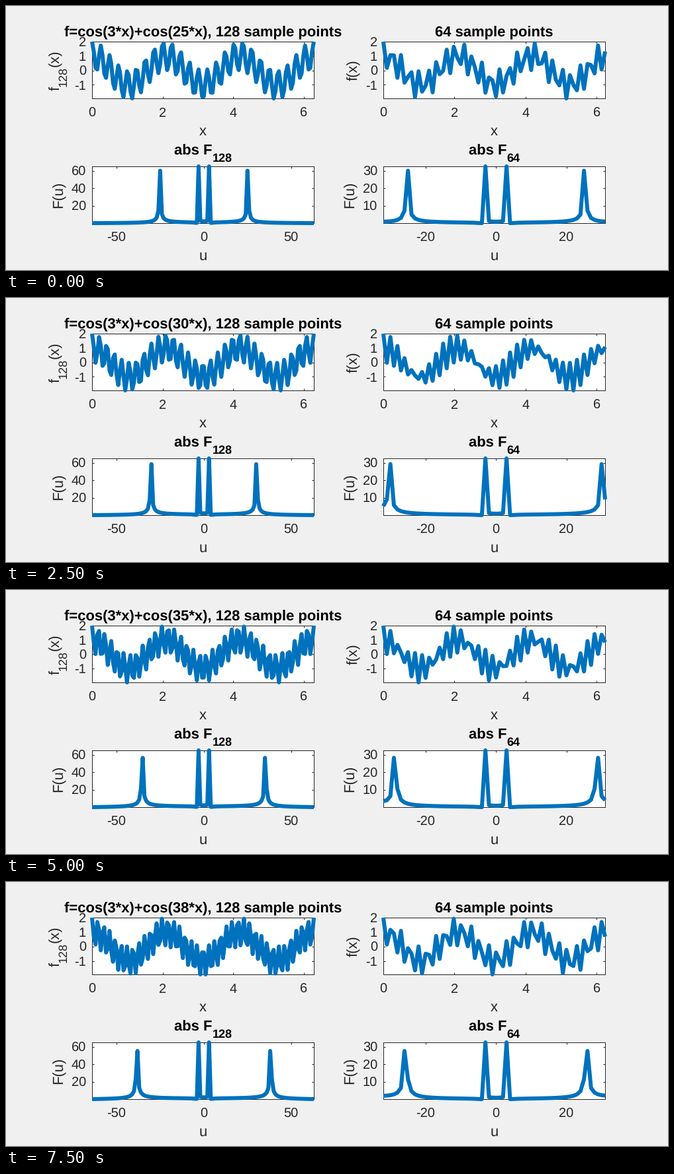
A matplotlib script for the animation above (8000 ms loop, 1000 by 400 pixels).

```python
import numpy as np
import matplotlib.pyplot as plt
from matplotlib.animation import FuncAnimation

W, H, DPI = 1000, 400, 100
PX = 72 / DPI  # points per pixel
INK = "#262626"
BLUE = "#0072bd"
LABEL, TICK, SUB = 22, 20, 17.6
PEAK, FRAMES = 39, 16

plt.rcParams.update({
    "font.family": "Liberation Sans",
    "text.hinting": "none",
    "text.hinting_factor": 1,
    "axes.unicode_minus": False,
    "path.simplify": False,
})

fig = plt.figure(figsize=(W / DPI, H / DPI), dpi=DPI, facecolor="#f0f0f0")


def put(x, y, s, size=LABEL, ha="center", **kw):
    """Write text with its baseline at a pixel position from the top left."""
    kw.setdefault("color", INK)
    return fig.text(x / W, 1 - y / H, s, fontsize=size * PX, ha=ha,
                    va="baseline", **kw)


def upward(x, y, s, size=LABEL):
    """Write text upwards, its baseline starting at (x, y)."""
    return put(x, y, s, size, "left", rotation=90, rotation_mode="anchor")


def panel(left, top, xlim, xticks, yticks, xlabel):
    w, h = 335, 86
    ax = fig.add_axes([left / W, 1 - (top + h) / H, w / W, h / H])
    ax.set_xlim(*xlim)
    ax.set_xticks(xticks, [str(t) for t in xticks])
    ax.set_yticks(yticks, [str(t) for t in yticks])
    ax.tick_params(direction="in", top=True, right=True, length=3.4 * PX,
                   width=PX, color=INK, labelcolor=INK, labelsize=TICK * PX)
    ax.tick_params(axis="x", pad=13.6 * PX)
    ax.tick_params(axis="y", pad=9 * PX)
    for spine in ax.spines.values():
        spine.set(linewidth=PX, color=INK)
    put(left + w / 2, top + h + 55.5, xlabel)
    line, = ax.plot([], [], color=BLUE, lw=6 * PX, clip_on=False, zorder=4,
                    solid_joinstyle="round", solid_capstyle="butt")
    return ax, line


def abs_title(x, n):
    bold = dict(ha="left", weight="bold", color="black")
    put(x, 225.5, "abs F", **bold)
    put(x + 57.5, 236, str(n), SUB, **bold)


x128 = np.linspace(0, 2 * np.pi, 128)
x64 = x128[::2]
u128 = np.arange(-64, 64)
u64 = np.arange(-32, 32)

wave_ticks = [-1, 0, 1, 2]
panels = [
    panel(130, 54, (0, x128[-1]), [0, 2, 4, 6], wave_ticks, "x"),
    panel(570, 54, (0, x64[-1]), [0, 2, 4, 6], wave_ticks, "x"),
    panel(130, 243, (-64, 63), [-50, 0, 50], [20, 40, 60], "u"),
    panel(570, 243, (-32, 31), [-20, 0, 20], [10, 20, 30], "u"),
]

title = put(297.5, 46, "", weight="bold", color="black")
put(737.5, 46, "64 sample points", weight="bold", color="black")
abs_title(254.2, 128)
abs_title(699, 64)

upward(80.5, 127.6, "f")
upward(91, 121.5, "128", SUB)
upward(80.5, 92.1, "(x)")
upward(531.5, 113, "f(x)")
upward(86, 305.5, "F(u)")
upward(526, 305.5, "F(u)")


def spectrum(f):
    return np.abs(np.fft.fftshift(np.fft.fft(f)))


def draw(i):
    # the frequency climbs one step per frame, then turns back
    k = PEAK - abs(FRAMES - 2 - i)
    f = np.cos(3 * x128) + np.cos(k * x128)
    half = f[::2]
    curves = [(x128, f), (x64, half),
              (u128, spectrum(f)), (u64, spectrum(half))]
    for (ax, line), (x, y) in zip(panels, curves):
        line.set_data(x, y)
        ax.set_ylim(y.min(), y.max())
    title.set_text(f"f=cos(3*x)+cos({k}*x), 128 sample points")
    return [line for _, line in panels] + [title]


anim = FuncAnimation(fig, draw, frames=FRAMES, interval=500, repeat=True,
                     repeat_delay=0, blit=False)
plt.show()
```
